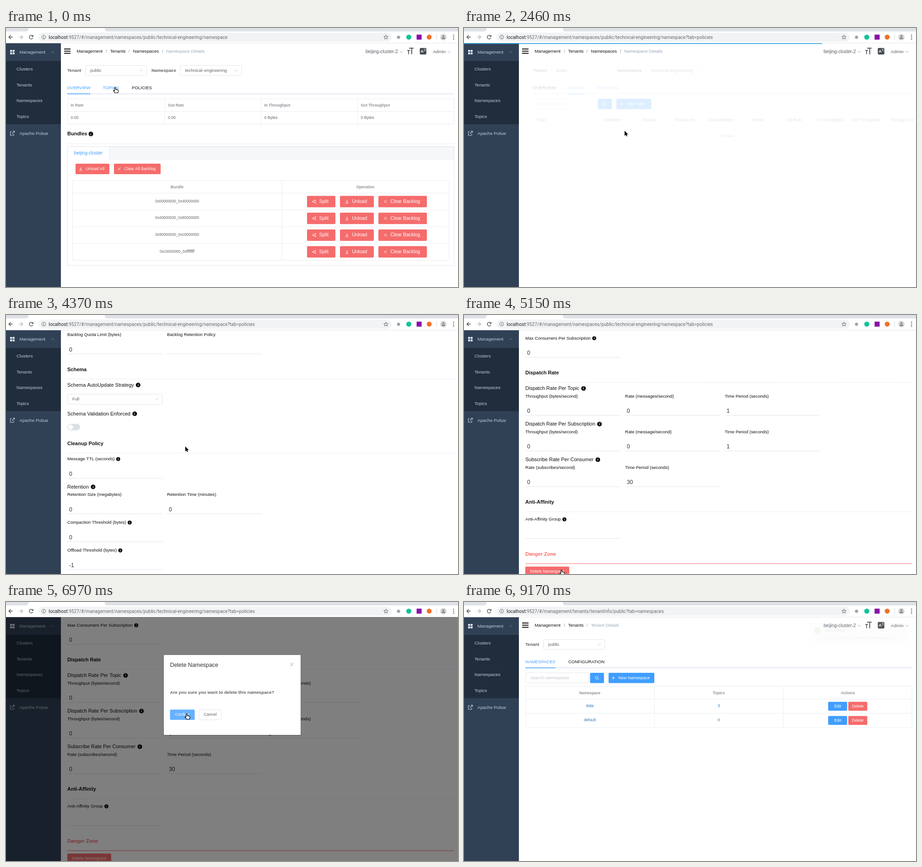
An HTML page with a canvas for the animation above (9.27 s loop, 988 by 567 pixels).

```html
<!DOCTYPE html>
<html lang="en">
<head>
<meta charset="utf-8">
<title>Namespace management</title>
<style>
html, body { margin: 0; width: 988px; height: 567px; overflow: hidden; background: #fff; }
canvas { display: block; width: 988px; height: 567px; }
</style>
</head>
<body>
<canvas id="stage"></canvas>
<script>
const W = 988, H = 567, LOOP = 9270;
const BLUE = '#409eff', RED = '#f56c6c', INK = '#101114', GREY = '#606266', PALE = '#909399',
  HINT = '#c0c4cc', EDGE = '#dcdfe6', LINE = '#e6e9ef', SIDE = '#bfcbd9';
const SANS = '"Liberation Sans", Arial, sans-serif';
const canvas = document.getElementById('stage');
const dpr = window.devicePixelRatio || 1;
canvas.width = W * dpr;
canvas.height = H * dpr;
const c = canvas.getContext('2d');
c.textBaseline = 'middle';

// ---------- timing ----------
const clamp = p => Math.min(1, Math.max(0, p));
const span = (t, from, length) => clamp((t - from) / length);
const smooth = p => p * p * (3 - 2 * p);
function ease(p) { // CSS "ease"
  if (p <= 0 || p >= 1) return p;
  let lo = 0, hi = 1, u = p;
  for (let i = 0; i < 14; i++) {
    u = (lo + hi) / 2;
    if (.75 * u * (1 - u) + u ** 3 < p) lo = u; else hi = u;
  }
  return .3 * u * (1 - u) ** 2 + 3 * u * u * (1 - u) + u ** 3;
}

// ---------- drawing helpers ----------
function text(s, x, y, size = 9.7, color = INK, align = 'left', weight = 'normal', family = SANS) {
  c.font = `${weight} ${size}px ${family}`;
  c.textAlign = align;
  c.fillStyle = color;
  c.fillText(s, x, y);
  return c.measureText(s).width;
}
const bold = (s, x, y, size, color, align = 'left') => text(s, x, y, size, color, align, 'bold');

function box(x, y, w, h, fill, stroke, r = 0) {
  c.beginPath();
  c.roundRect(x, y, w, h, r);
  if (fill) { c.fillStyle = fill; c.fill(); }
  if (stroke) { c.strokeStyle = stroke; c.lineWidth = .8; c.stroke(); }
}
function line(color, width, ...points) {
  c.strokeStyle = color;
  c.lineWidth = width;
  c.beginPath();
  for (let i = 0; i < points.length; i += 2) c.lineTo(points[i], points[i + 1]);
  c.stroke();
}
function dot(x, y, r, fill, stroke, width = 1) {
  c.beginPath();
  c.arc(x, y, r, 0, 7);
  if (fill) { c.fillStyle = fill; c.fill(); }
  if (stroke) { c.strokeStyle = stroke; c.lineWidth = width; c.stroke(); }
}
const rule = (y, color = LINE, x0 = 134, x1 = 980) => line(color, .8, x0, y, x1, y);
const chevron = (x, y, color, dir = 1) => line(color, .9, x - 3.2, y - 1.6 * dir, x, y + 1.6 * dir, x + 3.2, y - 1.6 * dir);
function cross(x, y, r, color, width = .9) {
  line(color, width, x - r, y - r, x + r, y + r);
  line(color, width, x - r, y + r, x + r, y - r);
}
function info(x, y, r = 5) {
  dot(x, y, r, '#000');
  text('i', x, y + .3, r * 1.7, '#fff', 'center', 'italic bold', '"Liberation Serif", serif');
}

const icons = {
  load(x, y) {
    line('#fff', .9, x, y - 3.4, x, y + 1.5);
    line('#fff', .9, x - 2.3, y - .7, x, y + 1.6, x + 2.3, y - .7);
    line('#fff', .9, x - 3.5, y + 3.4, x + 3.5, y + 3.4);
  },
  close(x, y) { cross(x, y, 2.8, '#fff'); },
  split(x, y) {
    line('#fff', .9, x + 2.6, y - 2.6, x - 2.4, y, x + 2.6, y + 2.6);
    dot(x - 2.6, y, 1.3, RED, '#fff', .9);
    dot(x + 2.6, y - 2.6, 1.2, RED, '#fff', .9);
    dot(x + 2.6, y + 2.6, 1.2, RED, '#fff', .9);
  },
  plus(x, y) {
    line('#fff', .9, x - 3.5, y, x + 3.5, y);
    line('#fff', .9, x, y - 3.5, x, y + 3.5);
  },
  search(x, y) {
    dot(x - .4, y - .4, 3, null, '#fff', .9);
    line('#fff', .9, x + 1.8, y + 1.8, x + 3.8, y + 3.8);
  }
};
function button(x, y, w, h, fill, label, size = 9, icon) {
  box(x, y, w, h, fill, fill === '#fff' && EDGE, 2);
  const cx = x + w / 2, cy = y + h / 2;
  c.font = `${size}px ${SANS}`;
  const shift = icon && label ? 5.7 : 0;
  if (icon) icons[icon](label ? cx - c.measureText(label).width / 2 - shift + .4 : cx, cy);
  text(label, cx + shift, cy, size, fill === '#fff' ? GREY : '#fff', 'center');
}
function select(x, y, w, label, color = GREY) {
  box(x, y - 11, w, 22, '#fff', EDGE, 2.5);
  text(label, x + 10.5, y + .3, 9.4, color);
  chevron(x + w - 12, y, HINT);
}
function searchRow(hint, label, w) {
  box(134.4, 155, 138, 22, '#fff', EDGE, 2.5);
  text(hint, 145, 166.3, 9.3, HINT);
  button(275.5, 155, 30.5, 22.5, BLUE, '', 9, 'search');
  button(316, 155, w, 22.5, BLUE, label, 9, 'plus');
}
// tabs: [label, left, right]
function tabBar(tabs, active, hover) {
  line('#dfe4ed', 1.4, 134, 144.3, 980, 144.3);
  tabs.forEach(([label, x0, x1], i) => {
    text(label, (x0 + x1) / 2, 131.3, 9.5, i === active || i === hover ? BLUE : INK, 'center');
    if (i === active) line(BLUE, 1.5, x0, 144.2, x1, 144.2);
  });
}
function grid(xs, ys) {
  ys.forEach(y => rule(y, LINE, xs[0], xs[xs.length - 1]));
  xs.forEach(x => line(LINE, .8, x, ys[0], x, ys[ys.length - 1]));
}

// ---------- pages ----------
function pickers(both) {
  bold('Tenant', 134, 93.3, 9.5, GREY);
  select(173.5, 93, 134, 'public');
  if (!both) return;
  bold('Namespace', 318, 93.3, 9.7, GREY);
  select(381, 93, 134, 'technical–engineering');
}
function namespaceTop(active, hover) {
  pickers(true);
  tabBar([['OVERVIEW', 134, 184], ['TOPICS', 211, 247], ['POLICIES', 275, 319]], active, hover);
}

function overview() {
  namespaceTop(0, 1);
  const cols = [134.4, 347, 557.5, 768.5, 979.5];
  grid(cols, [155, 182.5, 210.5]);
  ['In Rate', 'Out Rate', 'In Throughput', 'Out Throughput'].forEach((s, i) => {
    bold(s, cols[i] + 7, 169.3, 8.4, PALE);
    text(i < 2 ? '0.00' : '0 Bytes', cols[i] + 7, 196.3, 8.7, GREY);
  });
  bold('Bundles', 134, 232, 11);
  info(185.5, 232);
  rule(253.5);
  box(134.4, 259.5, 845, 260, '#fff', EDGE);
  box(226, 260, 753, 27, '#f5f7fa', '#e4e7ed');
  text('beijing-cluster', 148.5, 274, 10.2, BLUE);
  button(152, 297, 74, 23, RED, 'Unload All', 9, 'load');
  button(236, 297, 102, 23, RED, 'Clear All Backlog', 9, 'close');
  grid([145.5, 603, 968.5], [333.5, 361.5, 398.3, 435, 471.7, 508.5]);
  bold('Bundle', 374, 348.3, 8.4, PALE, 'center');
  bold('Operation', 785.5, 348.3, 8.4, PALE, 'center');
  ['0x00000000_0x40000000', '0x40000000_0x80000000', '0x80000000_0xc0000000', '0xc0000000_0xffffffff']
    .forEach((s, i) => {
      const y = 367.5 + i * 36.7;
      text(s, 374, y + 12, 8.3, GREY, 'center');
      button(658, y, 62, 25, RED, 'Split', 10.4, 'split');
      button(730, y, 74, 25, RED, 'Unload', 10.4, 'load');
      button(814, y, 106, 25, RED, 'Clear Backlog', 10.4, 'close');
    });
}

function topics() {
  namespaceTop(1, 2);
  searchRow('Search Topics', 'New Topic', 76);
  bold('Topic', 141, 201.8, 8.4, PALE);
  ['Partitions', 'Domain', 'Producers', 'Subscriptions', 'In Rate', 'Out Rate', 'In Throughput', 'Out Throughput', 'Storage Size']
    .forEach((s, i) => bold(s, 308 + i * 79.1, 201.8, 8.4, PALE, 'center'));
  rule(215.5);
  text('No Data', 557, 236.5, 8.9, PALE, 'center');
  rule(257);
}

// Returns the place of the last heading.
function policies(loaded) {
  let y = 175.5;
  const section = (s, gap = 0, color = INK, ruleColor = LINE) => {
    y += gap;
    bold(s, 134, y + .3, 11, color);
    rule(y + 21, ruleColor);
    y += 34;
  };
  const sub = s => {
    info(134 + text(s, 134, y + .5, 11) + 9.3, y);
    y += 17;
  };
  const pick = (w, label, value) => {
    select(134.4, y + 14, w, loaded ? value : label, loaded ? GREY : HINT);
    y += 46;
  };
  const fields = (labels, values, marked) => {
    labels.forEach((s, i) => {
      const x = 134 + i * 218;
      const w = text(s, x, y + .3, 9.6);
      if (marked) info(x + w + 7.8, y, 4.4);
      if (loaded) text(values[i], x + 4, y + 33, 12, '#303133');
      rule(y + 42, EDGE, x, x + 208);
    });
    y += 61;
  };
  const toggle = s => {
    sub(s);
    box(134, y + 5, 28, 14, EDGE, null, 7);
    dot(141, y + 12, 5.5, '#fff');
    y += 36;
  };
  const dispatch = (s, rate) => {
    sub(s);
    fields(['Throughput (bytes/second)', rate, 'Time Period (seconds)'], [0, 0, 1]);
  };

  namespaceTop(2);
  section('Clusters');
  sub('Replicated Clusters');
  pick(346, 'Please select clusters', '');
  if (loaded) {
    box(138, 232.5, 76, 16, '#f4f4f5', '#e9e9eb', 2);
    text('beijing-cluster', 142, 240.7, 8.5, PALE);
    dot(203.5, 240.3, 4, HINT);
  }
  section('Authorization');
  info(213.3, 272.5);
  button(134.4, y + 9, 57, 22, '#fff', 'Add Role');
  y += 52;
  section('Subscription Authentication');
  sub('Subscription Authentication Mode');
  pick(207, 'Please select Authentication', 'None');
  section('Storage');
  sub('Replication Factor');
  fields(['Ensembel Size', 'Write Quorum Size', 'Ack Quorum Size'], [1, 1, 1]);
  y += 8;
  fields(['Mark-Delete Max Rate'], [0], true);
  toggle('Encryption Required');
  toggle('Message Deduplication');
  section('Backlog', 12);
  sub('Backlog Quota');
  fields(['Backlog Quota Limit (bytes)', 'Backlog Retention Policy'], [0, '']);
  section('Schema', 15);
  sub('Schema AutoUpdate Strategy');
  pick(207, 'Full', 'Full');
  toggle('Schema Validation Enforced');
  section('Cleanup Policy', 12);
  fields(['Message TTL (seconds)'], [0], true);
  sub('Retention');
  fields(['Retention Size (megabytes)', 'Retention Time (minutes)'], [0, 0]);
  fields(['Compaction Threshold (bytes)'], [0], true);
  fields(['Offload Threshold (bytes)'], [-1], true);
  section('Throttling', 15);
  ['Topic', 'Topic', 'Subscription'].forEach((s, i) =>
    fields([`Max ${i ? 'Consumers' : 'Producers'} Per ${s}`], [0], true));
  section('Dispatch Rate', 15);
  dispatch('Dispatch Rate Per Topic', 'Rate (messages/second)');
  dispatch('Dispatch Rate Per Subscription', 'Rate (message/second)');
  sub('Subscribe Rate Per Consumer');
  fields(['Rate (subscribes/second)', 'Time Period (seconds)'], [0, 30]);
  section('Anti-Affinity', 15);
  y += 3.5;
  fields(['Anti-Affinity Group'], [''], true);
  section('Danger Zone', 15, RED, '#f44');
  button(134, y - 6.5, 96, 22, RED, 'Delete Namespace', 8.8);
  return y - 34;
}

function tenant() {
  pickers(false);
  tabBar([['NAMESPACES', 134, 200], ['CONFIGURATION', 228, 307]], 0);
  searchRow('Search namespaces', 'New Namespace', 100);
  grid([134.4, 416.5, 697.5, 979.5], [184.5, 212.5, 243.5, 275]);
  ['Namespace', 'Topics', 'Actions'].forEach((s, i) => bold(s, 275 + i * 282, 199.2, 8.4, PALE, 'center'));
  [['data', 3], ['default', 0]].forEach(([name, count], i) => {
    const y = 218.5 + i * 31;
    text(name, 275, y + 9.3, 8.7, '#337ab7', 'center');
    text(count, 557, y + 9.3, 8.7, '#337ab7', 'center');
    button(796, y, 41.5, 19.5, BLUE, 'Edit', 8.8);
    button(840, y, 41.5, 19.5, RED, 'Delete', 8.8);
  });
}

function dialog(x, y, w, hover) {
  c.save();
  c.shadowColor = 'rgba(0,0,0,.3)';
  c.shadowBlur = 2 * dpr;
  c.shadowOffsetY = dpr;
  box(x, y, w, 175, '#fff', null, 1.5);
  c.restore();
  text('Delete Namespace', x + 13.5, y + 22.5, 12.4, '#303133');
  cross(x + w - 19.5, y + 20.5, 3.4, PALE);
  bold('Are you sure you want to delete this namespace?', x + 13.5, y + 82.3, 9.7, GREY);
  button(x + 13.5, y + 119.5, 54, 22.5, hover ? '#66b1ff' : BLUE, 'Confirm');
  button(x + 77, y + 120, 49, 21.8, '#fff', 'Cancel');
}

// ---------- frame around the pages ----------
function header(t) {
  [46, 50.7, 55.4].forEach(y => line('#000', 1.9, 127, y, 141, y));
  const slash = x => text('/', x, 51.2, 9.7, PALE, 'center');
  text('Management', 154.5, 51.2);
  slash(219.5);
  text('Tenants', 227.5, 51.2);
  slash(269);
  const p = ease(span(t, LEAVE, 500));
  if (p < 1) {
    const d = 13.9 * p;
    c.globalAlpha = 1 - p;
    text('Namespaces', 277.5 + d, 51.2);
    slash((p ? 388 : 342) + d);
    text('Namespace Details', (p ? 295 : 350) + d, 51.2, 9.7, '#97a8be');
  }
  c.globalAlpha = p;
  text('Tenant Details', 277.5 + 13.9 * (1 - p), 51.2, 9.7, '#97a8be');
  c.globalAlpha = 1;

  text('beijing-cluster-2', 786, 51.8, 10, '#5a5e66');
  chevron(864, 52, PALE);
  line('#444950', 1.8, 881, 44.2, 891, 44.2);
  line('#444950', 1.8, 886.8, 44, 886.8, 57.5);
  line('#444950', 1.6, 877, 49, 883, 49);
  line('#444950', 1.6, 880, 49, 880, 57.5);
  box(904.5, 43.8, 14.3, 14.3, '#444950', null, 2);
  bold('A', 909.5, 51.5, 9, '#fff', 'center');
  text('文', 915.3, 48, 5.5, '#fff', 'center', 'normal', '"Noto Sans CJK SC", "Noto Sans CJK JP", sans-serif');
  text('Admin', 933, 51.8, 9.9, '#5a5e66');
  chevron(968.5, 52, PALE);
}

function sidebar() {
  box(0, 33, 120, 534, '#304156');
  box(0, 72, 120, 138.5, '#1f2d3d');
  for (let i = 0; i < 4; i++) box(9 + i % 2 * 5.5, 48 + (i >> 1) * 5.5, 4.3, 4.3, '#e3e9f0', null, .6);
  text('Management', 29.5, 53.5, 9.7, SIDE);
  chevron(102, 53, '#8493a5', -1);
  ['Clusters', 'Tenants', 'Namespaces', 'Topics'].forEach((s, i) => text(s, 23, 90.5 + i * 34.65, 9.7, SIDE));
  line(SIDE, 1.1, 13, 227, 9.5, 227, 9.5, 235, 17, 235, 17, 231.5);
  line(SIDE, 1.1, 13, 231.5, 18.3, 226);
  line(SIDE, 1.1, 15, 225.7, 18.6, 225.7, 18.6, 229.3);
  text('Apache Pulsar', 29.5, 231.3, 9.7, SIDE);
}

function browser(path) {
  box(0, 0, W, 33, '#fff');
  box(-8, -8, 57, 15.5, '#dee1e6', null, 5);
  box(216, -8, 790, 15.5, '#dee1e6', null, 5);
  rule(33, '#dcdee1', 0, W);
  box(71, 10.3, 772, 19.7, '#f1f3f4', null, 10);
  const arrow = (x, dir, color) => {
    line(color, 1.4, x - 4.2, 20, x + 4.2, 20);
    line(color, 1.4, x, 15.8, x + 4.2 * dir, 20, x, 24.2);
  };
  arrow(10.5, -1, '#45494d');
  arrow(32.5, 1, '#b4b7ba');
  c.strokeStyle = '#45494d';
  c.lineWidth = 1.4;
  c.beginPath();
  c.arc(55, 20, 4, .5, 5.6);
  c.stroke();
  line('#45494d', 1.4, 59.2, 15.4, 59.2, 18.6, 55.8, 18.6);
  dot(82.5, 20, 4.2, null, '#5f6368', 1);
  line('#5f6368', 1.1, 82.5, 19.4, 82.5, 22.4);
  line('#5f6368', 1.1, 82.5, 17.3, 82.5, 18.4);
  const roboto = 'Roboto, sans-serif';
  const w = text('localhost', 93.3, 20.9, 10.13, '#202124', 'left', 'normal', roboto);
  text(path, 93.3 + w, 20.9, 10.13, '#686c71', 'left', 'normal', roboto);
  const star = [];
  for (let i = 0; i <= 10; i++) {
    const r = i % 2 ? 2.1 : 5, a = i * Math.PI / 5;
    star.push(830.5 + r * Math.sin(a), 20.3 - r * Math.cos(a));
  }
  line('#5f6368', 1, ...star);
  dot(858, 20.3, 3.5, '#a0a3a6');
  dot(880.5, 20, 5.6, '#15c39a');
  box(897.5, 14.5, 11, 11, '#8a0fa8');
  dot(925, 20, 5.4, '#f2702a');
  line('#cfd2d5', 1, 941, 14, 941, 26);
  dot(956, 20, 7, '#d4d6d9');
  dot(956, 18, 2.2, '#85898d');
  box(952, 21, 8, 3.2, '#85898d', null, 1.6);
  [15.8, 20, 24.2].forEach(y => dot(978.3, y, 1.2, '#5f6368'));
}

function toast(t) {
  const alpha = 1 - span(t, 8890, 300);
  if (t < LEAVE || !alpha) return;
  const x = 754 + 226 * (1 - ease(span(t, LEAVE, 300)));
  c.save();
  c.globalAlpha = alpha;
  c.shadowColor = 'rgba(0,0,0,.14)';
  c.shadowBlur = 8 * dpr;
  c.shadowOffsetY = 1.5 * dpr;
  box(x, 44.5, 226, 52, '#fff', null, 5);
  c.shadowColor = 'transparent';
  box(x, 44.5, 226, 52, null, '#ebeef5', 5);
  dot(x + 18, 62.7, 7.5, '#67c23a');
  line('#fff', 1.3, x + 14.6, 62.8, x + 17.2, 65.3, x + 21.6, 60.6);
  bold('success', x + 35, 62.2, 11.1, '#303133');
  text('Successfully delete the namespace', x + 35, 79, 9.8, GREY);
  cross(x + 212, 63.2, 3, PALE);
  c.restore();
}

// ---------- pointer ----------
const HAND = new Path2D('M-1.3 1Q0-.6 1.3 1V4.6Q3 3.6 3.4 5Q5 4.4 5.3 5.6Q7 5.4 7 7V9.5L6 12H-.5Q-1 10.5-3.6 7.6Q-3.4 5.8-1.3 7.4Z');
const ARROW = new Path2D('M0 0V11L2.6 8.7L4.2 12.2L6 11.4L4.4 8H7.8Z');
const moves = [ // start, end, x, y
  [0, 0, 238.5, 130], [350, 1140, 290.5, 134], [2230, 2640, 392.3, 287],
  [4350, 5050, 213, 558], [6230, 6670, 395, 244.5], [8350, 9000, 402, 580]
];
const handTimes = [[0, 650], [1350, 2330], [5000, 5950], [6600, 7120]];
function pointer(t) {
  let x, y;
  moves.forEach(([from, to, nx, ny], i) => {
    const p = i ? smooth(span(t, from, to - from)) : 1;
    x = i ? x + (nx - x) * p : nx;
    y = i ? y + (ny - y) * p : ny;
  });
  const hand = handTimes.some(([a, b]) => t >= a && t < b);
  c.save();
  c.translate(x, y);
  c.lineJoin = 'round';
  c.lineWidth = 1.2;
  c.strokeStyle = hand ? '#000' : '#fff';
  c.fillStyle = hand ? '#fff' : '#000';
  if (!hand) c.stroke(ARROW);
  c.fill(hand ? HAND : ARROW);
  if (hand) c.stroke(HAND);
  c.restore();
}

// ---------- timeline ----------
const LEAVE = 7070;
const base = ':9527/#/management/';
const details = base + 'namespaces/public/technical-engineering/namespace';
const views = [ // page, enters, leaves, address
  [overview, -999, 200, details],
  [topics, 1510, 2200, details + '?tab=topics'],
  [policies, 3020, LEAVE, details + '?tab=policies'],
  [tenant, 7800, Infinity, base + 'tenants/tenantInfo/public?tab=namespaces']
];
const depth = policies(true) - 523.3;

function render(t) {
  c.setTransform(dpr, 0, 0, dpr, 0, 0);
  box(0, 0, W, H, '#fff');
  const scroll = t < LEAVE ? depth * smooth(span(t, 3650, 1400)) : 0;
  let path = details;
  views.forEach(([draw, enter, leave, address], i) => {
    if (i && t >= views[i - 1][2]) path = address;
    if (t < enter || t >= leave + 500) return;
    const p = ease(span(t, enter, 500)), q = ease(span(t, leave, 500));
    c.save();
    c.translate(20.8 * (p - 1 + q), -scroll);
    draw(t > 3600);
    if (draw === policies && t >= LEAVE) dialog(426, 151, 262);
    c.restore();
    box(120, 33, W - 120, H - 33, `rgba(255,255,255,${1 - p * (1 - q)})`);
  });
  c.save();
  c.translate(0, -scroll);
  header(t);
  c.restore();
  sidebar();
  browser(path);

  const shade = t < LEAVE ? ease(span(t, 5880, 300)) : 0;
  if (shade) {
    box(0, 33, W, H - 33, `rgba(0,0,0,${shade / 2})`);
    c.globalAlpha = shade;
    dialog(345, 116 - 14 * (1 - shade), 299, t > 6600);
    c.globalAlpha = 1;
  }
  if (t >= 2250 && t < 2640) line('#2299dd', 1.4, 0, 34.2, W * (.3 + .7 * span(t, 2250, 300)), 34.2);
  if (t >= LEAVE && t < 7600) {
    line('#5cb4e6', 1.4, 0, 34.2, W, 34.2);
    line('#8a8a8a', 1.2, 987.4, 35, 987.4, 196);
  }
  toast(t);
  pointer(t);
}

const start = performance.now();
(function tick() {
  render((performance.now() - start) % LOOP);
  requestAnimationFrame(tick);
})();
</script>
</body>
</html>
```
